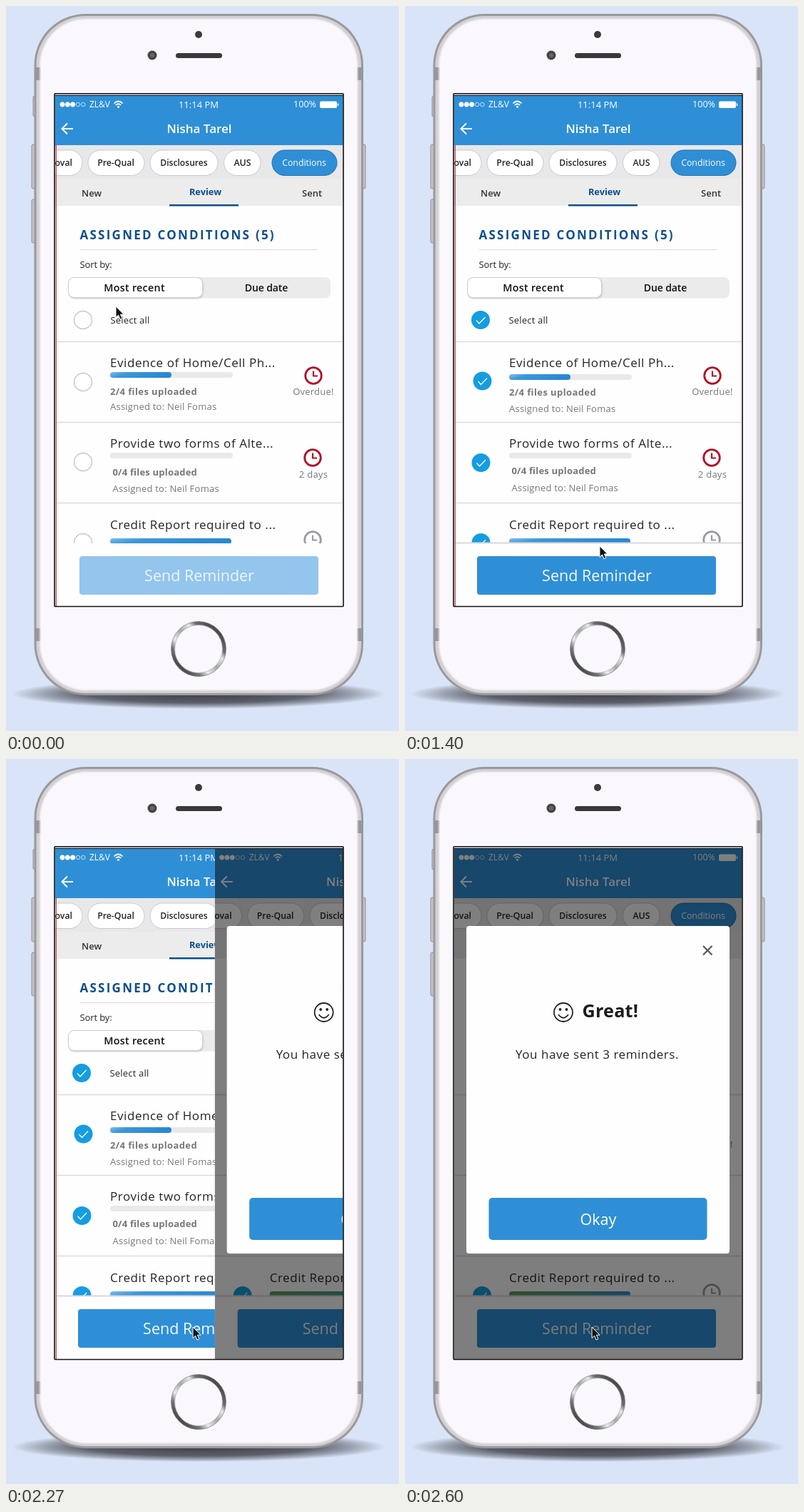
Animation, 551 px wide and 1016 px high, one loop 2670 ms. Source, as an HTML page:

```html
<!DOCTYPE html>
<html lang="en">
<head>
<meta charset="utf-8">
<title>Send reminder</title>
<style>
html, body { margin: 0; width: 100%; height: 100%; overflow: hidden; background: #d9e4f8; }
svg { display: block; width: 551px; height: 1016px; font-family: "Open Sans", sans-serif; }
text { white-space: pre; }
</style>
</head>
<body>
<svg id="stage" viewBox="0 0 551 1016"></svg>
<script>
const BLUE = '#2f8fd6', NAVY = '#0d4f8b', INK = '#242428', GRAY = '#77777b', RED = '#b01226';

const rect = (x, y, w, h, fill, r = 0, more = '') =>
  `<rect x="${x}" y="${y}" width="${w}" height="${h}" rx="${r}" fill="${fill}" ${more}/>`;
const circle = (x, y, r, fill, more = '') =>
  `<circle cx="${x}" cy="${y}" r="${r}" fill="${fill}" ${more}/>`;
const line = (d, color, width = 1, more = '') =>
  `<path d="${d}" fill="none" stroke="${color}" stroke-width="${width}" ${more}/>`;
const text = (x, y, size, str, fill = INK, weight = 400, gap = 0, anchor = 'start') =>
  `<text x="${x}" y="${y}" font-size="${size}" fill="${fill}" font-weight="${weight}" letter-spacing="${gap}" text-anchor="${anchor}">${str}</text>`;
const mid = (x, y, size, str, fill, weight, gap) => text(x, y, size, str, fill, weight, gap, 'middle');
const gradient = (id, stops, dir = '', kind = 'linear') =>
  `<${kind}Gradient id="${id}" ${dir}>${stops.map(([at, c]) => `<stop offset="${at}" stop-color="${c}"/>`).join('')}</${kind}Gradient>`;

const defs = `<defs>
  <clipPath id="view">${rect(69, 125, 403.5, 716, '#000')}</clipPath>
  <clipPath id="list">${rect(69, 400, 404, 353, '#000')}</clipPath>
  <filter id="soft"><feGaussianBlur stdDeviation="1"/></filter>
  ${gradient('shade', [[0, '#3c3e46'], [.6, '#3c3e46cc'], [.82, '#3c3e4666'], [1, '#3c3e4600']], '', 'radial')}
  ${gradient('fill', [[0, '#7fbcec'], [.3, '#3d97da'], [1, '#2788d2']], 'y2=".25"')}
  ${gradient('done', [[0, '#5f9a5c'], [.55, '#4f9480'], [1, BLUE]])}
  ${gradient('ring', [[.15, '#4c4c4e'], [.28, '#6c6c6e'], [.36, '#e8e8ea'], [.5, '#a6a6a8'], [.64, '#ececee'], [.74, '#777779'], [.85, '#4c4c4e']], 'x1="1" y1="0" x2="0" y2="1"')}
</defs>`;

function phone() {
  const bands = [86, 872].map(y => [40, 492].map(x => rect(x, y, 9, 18, '#98969a')).join('')).join('');
  const keys = [[38, 126, 4, 29], [36, 194, 6, 62], [36, 271, 6, 61], [499, 194, 5, 62]]
    .map(([x, y, w, h]) => rect(x, y, w, h, '#c4c2c6', 2, 'stroke="#929094" stroke-width="1"')).join('');
  return `<ellipse cx="270" cy="964" rx="262" ry="21" fill="url(#shade)"/>` + keys +
    rect(39.5, 11, 461.5, 955, '#9b999c', 72) +
    rect(42.5, 14, 455.5, 949, '#d2d0d3', 69) + bands +
    rect(47.5, 18, 445.5, 941, '#faf8fc', 65, 'filter="url(#soft)"') +
    circle(270, 40, 5, '#3d3a3d') +
    circle(205, 69, 6.5, '#454346') + circle(205, 69, 3, '#696769') +
    rect(238, 66, 65, 7, '#3a383a', 3.5) +
    circle(270, 901, 36, 'none', 'stroke="url(#ring)" stroke-width="5"') +
    circle(270, 901, 38.5, 'none', 'stroke="#858587" stroke-width=".8"') +
    circle(270, 901, 33.4, 'none', 'stroke="#a5a5a7" stroke-width=".6"');
}

function header() {
  const dots = [79, 86.3, 93.6, 101, 108.3].map((x, i) =>
    circle(x, 138, i < 3 ? 3.2 : 2.7, i < 3 ? '#fff' : 'none', 'stroke="#fff" stroke-width=".7"')).join('');
  const pills = [[20, 87], [115, 79], [202, 95], [305.5, 51.5], [373, 91]].map(([x, w], i) =>
    rect(x, 202, w, 35.5, i < 4 ? '#fff' : BLUE, 17.7, `stroke="${i < 4 ? '#c9c9cd' : '#236fab'}"`)).join('');
  return rect(69, 125, 404, 70, BLUE) + dots +
    text(117, 142, 12, 'ZL&amp;V', '#fff') +
    line('M151.5 136.5Q157.5 130.5 163.5 136.5M153.8 139Q157.5 135.5 161.2 139', '#fff', 1.7) +
    circle(157.5, 141.3, 1.5, '#fff') +
    mid(270, 143, 13, '11:14 PM', '#fff') + text(403, 142, 12.6, '100%', '#fff') +
    rect(440, 133.5, 24, 9.5, '#fff', 2) + rect(464.8, 136.5, 1.5, 3.5, '#fff') +
    line('M94 172H79M86 164.5L78.5 172L86 179.5', '#fff', 2) +
    mid(271, 178, 17, 'Nisha Tarel', '#fff', 600) +
    rect(69, 195, 404, 48, '#e8e8ea') + rect(69, 242, 404, 38, '#ececed') + pills +
    text(93, 224, 12.3, 'Approval', INK, 600, 0, 'end') +
    mid(154, 224, 12.3, 'Pre-Qual', INK, 600) + mid(249.5, 224, 12.1, 'Disclosures', INK, 600) +
    mid(331.5, 224, 12.4, 'AUS', INK, 600) + mid(418, 224, 12.3, 'Conditions', '#fff', 500) +
    mid(120, 267, 13, 'New', '#333337', 600) + mid(279.5, 265, 12.8, 'Review', NAVY, 700) +
    mid(429, 267, 13, 'Sent', '#333337', 600) + rect(229, 278, 97, 2.5, NAVY);
}

const tick = (x, y, on) => on
  ? circle(x, y, 13, '#159de0') + line(`M${x - 6} ${y + .5}l4 4.5l8.5 -9`, '#fff', 1.2)
  : circle(x, y, 12.5, '#fff', 'stroke="#c6c6cd" stroke-width="1.4"');

const clock = (x, y, color) =>
  circle(x, y, 11.3, 'none', `stroke="${color}" stroke-width="2.8"`) +
  line(`M${x} ${y - 6.5}v7h6`, color, 2.2);

function bar(y, width, fill) {
  return rect(146, y, 172, 8, '#e9e9ec', 4) + (width ? rect(146, y, width, 8, fill, 4) : '');
}

function screen(on, modal) {
  const who = 'Assigned to: Neil Fomas';
  const rows =
    tick(on ? 106 : 108, 440, on) + text(on ? 145.5 : 146.5, 445, 13, 'Select all', INK, 400, .2) +
    tick(on ? 108.5 : 108, on ? 525.5 : 527, on) +
    text(146, 506, 17, 'Evidence of Home/Cell Ph...', INK, 400, .55) +
    bar(on ? 516 : 513, 86, 'url(#fill)') +
    text(146, on ? 546 : 545, 13, '2/4 files uploaded', GRAY, 700, .4) +
    text(146, on ? 569 : 566, 13, who, GRAY, 400, .23) +
    clock(431, 518, RED) + mid(431, 545, 13, 'Overdue!', GRAY, 400, .25) +
    tick(on ? 106.5 : 108, on ? 640 : 639, on) +
    text(146, 619, 17, 'Provide two forms of Alte...', INK, 400, .55) + bar(626, 0) +
    text(149.5, on ? 656 : 658, 13, '0/4 files uploaded', GRAY, 700, .2) +
    text(149.5, on ? 680 : 681, 13, who, GRAY, 400, .23) +
    clock(430, 633, RED) + mid(431, 661, 13, '2 days', GRAY, 400, .25) +
    tick(modal ? 108 : on ? 106.5 : 108, 752, on) +
    text(146, 733, 17, 'Credit Report required to ...', INK, 400, .55) +
    rect(146, 746, 170, 8, modal ? 'url(#done)' : 'url(#fill)', 4) + clock(430, 748, '#9b9ba0');
  const dx = on ? -2 : 0;
  return rect(69, 125, 404, 717, '#fefefe') + header() +
    text(103.5, 326.5, 17, 'ASSIGNED CONDITIONS (5)', NAVY, 700, 2.25) +
    line('M104 341.5H437', '#d9d9dc', 1.2) + text(103.5, 367, 13, 'Sort by:', INK, 400, -.1) +
    rect(87, 380, 368, 29.5, '#ebebed', 8) +
    rect(88, 381.5, 188.5, 28.5, '#c4c4c8', 8, 'filter="url(#soft)"') +
    rect(87.5, 380.5, 188, 28, '#fff', 8, 'stroke="#cfcfd3"') +
    mid(180, 399.5, 14.3, 'Most recent', '#111', 600, .3) + mid(365, 399.5, 14, 'Due date', '#111', 600, -.1) +
    line('M70 470.5H473M70 583.5H473M70 696.5H473', '#dcdce0', 1.3) +
    `<g clip-path="url(#list)">${rows}</g>` +
    (on ? line('M70 752.5H473', '#d9d9de', 2) : '') +
    rect(103 + dx, 771, 335, 54, on ? BLUE : '#93c5ed', 4) +
    mid(271 + dx, 806, 21.5, 'Send Reminder', on ? '#f4f9fd' : '#eef6fd');
}

function dialog() {
  return screen(true, true) + rect(69, 125, 404, 717, '#000', 0, 'opacity=".5"') +
    rect(86, 234, 369, 459, '#fefefe', 4) +
    line('M418 262l12.5 12.5M430.5 262l-12.5 12.5', '#58585c', 2.2) +
    circle(222, 355, 13, 'none', `stroke="${INK}" stroke-width="1.8"`) +
    circle(217.5, 351, 1.9, INK) + circle(226.5, 351, 1.9, INK) +
    line('M215 358Q222 367.5 229 358', INK, 1.8) +
    text(248.5, 362, 25.2, 'Great!', '#1c1c20', 700, .2) +
    text(155, 420, 17, 'You have sent 3 reminders.', INK, 400, .54) +
    rect(117.5, 615, 306, 59, BLUE, 5) + mid(271, 653, 21.5, 'Okay', '#fff');
}

const arrow = `<path id="arrow" d="M0 0V15.5L3.6 12.2L6 18L8.8 16.8L6.4 11.2H11Z" fill="#111" stroke="#fff" stroke-width="1"/>`;
const hand = `<path id="hand" d="M0 1.5Q1.5 -.5 3 1.5L4.5 6.5Q6 5 7.2 6.3Q8.8 5 9.8 6.8Q11.6 6 12 8L12.5 13L11 18H4L-2.5 11.5Q-3.5 9 -1 9.5L2 11.5Z
  M5 10v4M7.5 10v4M10 10v4" fill="#fff" stroke="#222" stroke-width="1.2" stroke-linejoin="round"/>`;

const stage = document.getElementById('stage');
stage.innerHTML = defs + phone() +
  `<g clip-path="url(#view)">
    <g id="off">${screen(false)}</g><g id="on">${screen(true)}</g>
    ${line('M70.3 195V841', '#b0384a', 1.2)}
    <g id="sheet"><g clip-path="url(#view)">${dialog()}</g></g>
  </g>` +
  rect(68, 122.7, 405, 718.8, 'none', 1, 'stroke="#111" stroke-width="1.6"') +
  line('M69 125.3H473', '#14202c', 1.3) + arrow + hand;

const $ = id => document.getElementById(id);
const show = (id, yes) => $(id).setAttribute('display', yes ? 'inline' : 'none');
const move = (id, x, y) => $(id).setAttribute('transform', `translate(${x} ${y})`);
// Smoothstep; a power above 1 makes the start slower.
const ease = (t, start, span, power = 1) => {
  const p = Math.min(1, Math.max(0, (t - start) / span)) ** power;
  return p * p * (3 - 2 * p);
};
const LOOP = 2670, STEP = 200 / 3;
const CLICK = 800;

function pointer(t) {
  const a = ease(t, 0, 500), b = ease(t, 930, 600), c = 1 - b;
  if (!b) return [154 - 42 * a, 421 + 22 * a];
  const bend = (from, via, to) => c * c * from + 2 * c * b * via + b * b * to;
  return [bend(112, 324, 262), bend(443, 635, 796)];
}

function draw(now) {
  const t = Math.floor((now % LOOP + 4) / STEP) * STEP;
  const [x, y] = pointer(t);
  const hover = Math.hypot(x - 108, y - 440) < 14;
  const slide = ease(t, 1960, 615, 1.1);
  show('off', t < CLICK - 1);
  show('on', t >= CLICK - 1);
  show('sheet', slide > 0);
  move('sheet', 405 * (1 - slide), 0);
  show('hand', hover);
  show('arrow', !hover);
  move(hover ? 'hand' : 'arrow', x, y);
}

const start = performance.now();
function tickFrame() {
  draw(performance.now() - start);
  requestAnimationFrame(tickFrame);
}
tickFrame();
</script>
</body>
</html>
```
